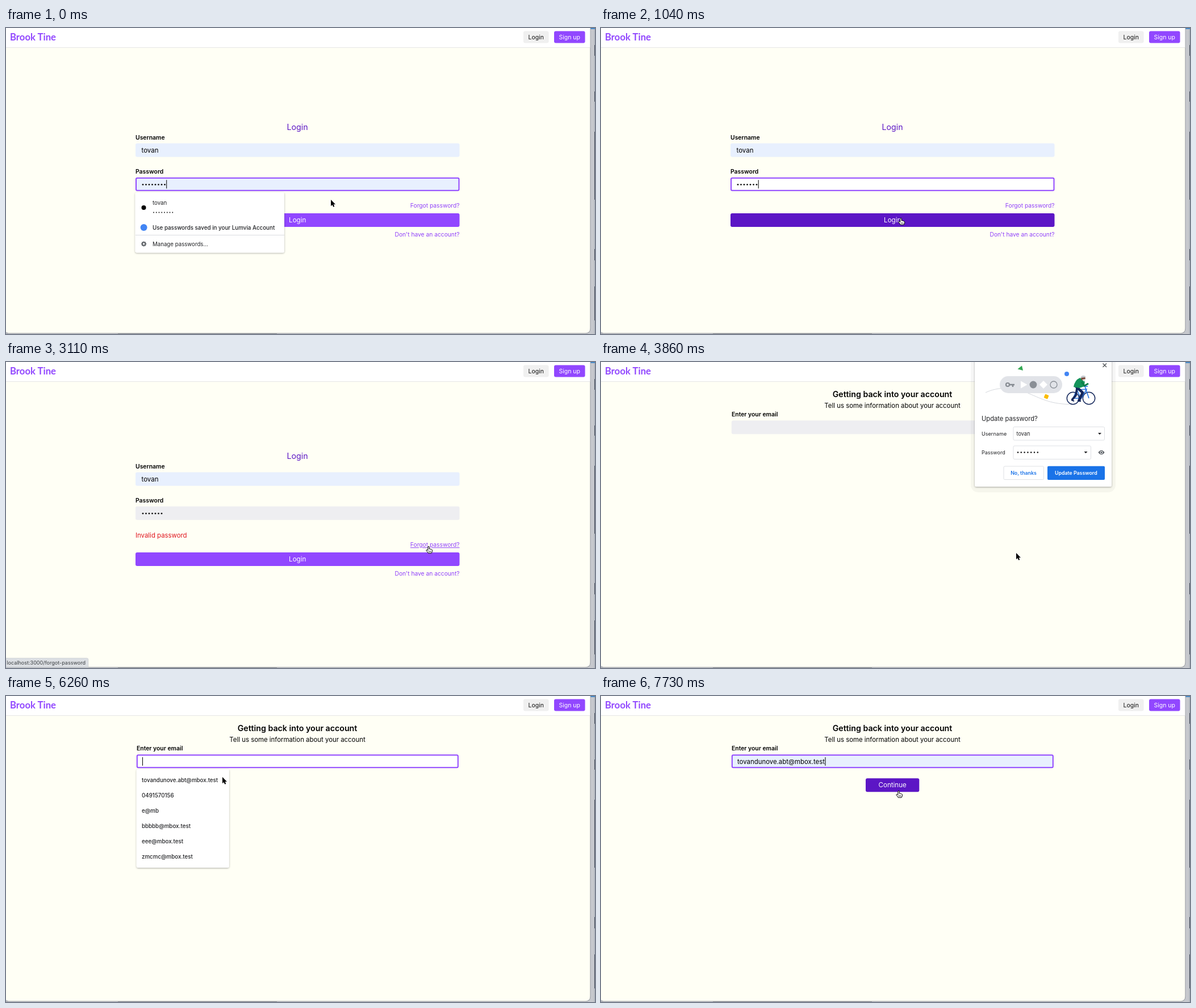
An HTML page for the animation above (8000 ms loop, 1037 px wide and 540 px high).

```html
<!DOCTYPE html>
<html lang="en">
<head>
<meta charset="utf-8">
<title>Login and password reset</title>
<style>
html, body { margin: 0; width: 100%; height: 100%; overflow: hidden; background: #fffff5; }
svg { display: block; width: 100vw; height: 100vh; }
text { font-family: Inter, Roboto, sans-serif; white-space: pre; }
</style>
</head>
<body>
<svg id="stage" viewBox="0 0 1037 540" preserveAspectRatio="none">
  <defs>
    <filter id="shadow" x="-10%" y="-10%" width="120%" height="125%">
      <feDropShadow dx="0" dy="1" stdDeviation="1.4" flood-color="#000" flood-opacity=".33"/>
    </filter>
  </defs>
  <g id="frame"></g>
  <g id="page"></g>
  <g id="pointer"></g>
</svg>
<script>
const LOOP = 8000, STEP = 148.7, LEAD = 14;
const PURPLE = '#9147ff', DEEP = '#5c16c5', LINK = '#8f3ffa', FILLED = '#e8f0fe', GREY = '#eeeef1', INK = '#202124';
const USER = 'tovan', EMAIL = 'tovandunove.abt@mbox.test';
const SUGGESTIONS = [EMAIL, '0491570156', 'e@mb', 'bbbbb@mbox.test', 'eee@mbox.test', 'zmcmc@mbox.test'];

// Pointer path: step, x, y of the hot spot
const PATH = [
  [0, 572, 303], [2, 571, 304], [4, 556, 313], [6, 528, 335], [12, 528, 335], [16, 684, 349],
  [19, 742, 328], [20, 744, 325], [24, 744, 325], [25, 737, 331], [26, 731, 337], [27, 733, 328],
  [28, 733, 328], [33, 752, 198], [34, 753, 196], [35, 753, 196], [39, 420, 121], [40, 385, 117],
  [41, 383, 121], [42, 381, 143], [43, 372, 146], [45, 368, 147], [48, 515, 163], [49, 524, 167]
];

const $ = id => document.getElementById(id);

const rect = (x, y, w, h, fill, r = 0, extra = '') =>
  `<rect x="${x}" y="${y}" width="${w}" height="${h}" rx="${r}" fill="${fill}" ${extra}/>`;
const path = (d, fill = 'none', stroke = 'none', width = 1, extra = '') =>
  `<path d="${d}" fill="${fill}" stroke="${stroke}" stroke-width="${width}" ${extra}/>`;
const circle = (x, y, r, fill, stroke = 'none', width = 1) =>
  `<circle cx="${x}" cy="${y}" r="${r}" fill="${fill}" stroke="${stroke}" stroke-width="${width}"/>`;
// y is the middle of the capitals
const text = (x, y, size, words, fill = '#000', weight = 400, anchor = 'start', extra = '') =>
  `<text x="${x}" y="${y + size * .36}" font-size="${size}" fill="${fill}" font-weight="${weight}" text-anchor="${anchor}" ${extra}>${words}</text>`;
const dots = (x, y, count, gap, r) =>
  Array.from({ length: count }, (_, i) => circle(x + i * gap, y, r, '#111')).join('');
const caret = (x, y) => rect(x, y - 7.5, 1, 15, '#000');
const field = (x, y, w, fill, focused) => focused
  ? rect(x + 1, y + 1, w - 2, 22, fill, 2, `stroke="${PURPLE}" stroke-width="2"`)
  : rect(x, y, w, 24, fill, 3);
const button = (x, y, w, label, fill) =>
  rect(x, y, w, 24, fill, 3) + text(x + w / 2, y + 12, 11.6, label, '#fff', 400, 'middle');
const card = (x, y, w, h) => rect(x, y, w, h, '#fff', 3, 'filter="url(#shadow)"');

function pointerAt(n) {
  const i = PATH.findIndex(key => key[0] > n);
  if (i < 0) return PATH[PATH.length - 1].slice(1);
  const [a, ax, ay] = PATH[i - 1], [b, bx, by] = PATH[i];
  const k = (n - a) / (b - a);
  return [ax + (bx - ax) * k, ay + (by - ay) * k];
}

const inside = ([x, y], left, top, w, h) => x >= left && x <= left + w && y >= top && y <= top + h;

function drawFrame() {
  const edge = [[30, 19], [112, 18], [183, 120], [390, 20], [456, 60]]
    .map(([y, h]) => rect(1036, y, 1, h, '#3c4453')).join('');
  return rect(0, 0, 1037, 540, '#c6c8cd') + rect(1029, 0, 8, 2, '#4a8ac6') + rect(1035.5, 2, 1.5, 538, '#aeb3bd') + edge +
    path('M0 538.6H1020Q1028.6 538.6 1028.6 530V0', 'none', '#9c9fa4', 1.4) +
    rect(197, 539, 280, 1, '#8c9095') +
    path('M0 0H1028.3V530Q1028.3 538.3 1020 538.3H4L0 536Z', '#fffff5') +
    rect(0, 0, 1028.3, 34, '#fff') + rect(0, 34, 1028.3, 1, '#e6e6e6') +
    text(7, 16, 16.7, 'Brook Tine', PURPLE, 700, 'start', 'style="font-family:Lato,sans-serif"') +
    rect(911, 5.5, 44.5, 21, '#f0f0f0', 3) + text(933.2, 16, 10.5, 'Login', '#111', 400, 'middle') +
    rect(965, 5.5, 54.5, 21, PURPLE, 3) + text(992.2, 16, 10.5, 'Sign up', '#fff', 400, 'middle');
}

function savedPasswords() {
  const teeth = Array.from({ length: 8 }, (_, i) =>
    rect(241.6, 376.4, 2, 2.6, '#5f6368', .4, `transform="rotate(${i * 45} 242.6 381)"`)).join('');
  return card(227.5, 290, 262.5, 106.5) +
    circle(242.5, 317, 4, '#000') +
    text(258, 308.5, 9.7, USER, INK) + dots(260, 325.5, 8, 4.75, .95) +
    circle(242.6, 352, 6, '#4285f4') +
    text(258, 352, 9.8, 'Use passwords saved in your Lumvia Account', INK, 500) +
    rect(228, 365, 262, 1, '#dadce0') +
    teeth + circle(242.6, 381, 2.6, 'none', '#5f6368', 1.7) +
    text(258, 381.3, 9.7, 'Manage passwords…', INK);
}

function loginPage(n, at) {
  const edited = n >= 2, focused = n < 8, failed = n >= 11;
  const up = failed ? -9 : 0, down = failed ? 9 : 0;
  const overButton = inside(at, 228, 327 + down, 570.5, 24);
  const overLink = n >= 18 && inside(at, 712, 314 + down, 87, 16);
  const count = edited ? 7 : 8;
  const fill = !edited ? FILLED : focused ? '#fff' : GREY;
  let out = text(513, 175 + up, 14.2, 'Login', DEEP, 400, 'middle') +
    text(228, 193 + up, 10.4, 'Username', '#000', 600) +
    field(228, 203.5 + up, 570.5, FILLED) + text(238.5, 215.7 + up, 11.5, USER) +
    text(228, 253 + up, 10.4, 'Password', '#000', 600) +
    field(228, 263.7 + up, 570.5, fill, focused) + dots(241, 276.3 + up, count, 5.5, 1.4) +
    (focused ? caret(238.2 + count * 5.5, 275.7) : '') +
    (failed ? text(228, 306, 11.4, 'Invalid password', '#e0161f') : '') +
    text(798.5, 313.5 + down, 10.25, 'Forgot password?', LINK, 400, 'end', overLink ? 'text-decoration="underline"' : '') +
    button(228, 327 + down, 570.5, 'Login', overButton ? DEEP : PURPLE) +
    text(798.5, 364.5 + down, 10.25, "Don't have an account?", LINK, 400, 'end');
  if (!edited) out += savedPasswords();
  return { out, hand: overButton || overLink };
}

function cyclist() {
  const blue = '#1f6fe0', navy = '#14275b';
  return circle(831, 64, 10.7, 'none', navy, 1.5) + circle(859, 64, 10.7, 'none', navy, 1.5) +
    path('M831 64L838 49L855 48L845 65L838 49M831 64H845M852 43L859 64M850 43H857', 'none', blue, 1.5) +
    path('M836 43L848 54L841 69', 'none', navy, 4.6, 'stroke-linejoin="round"') +
    path('M838 46L836 59L829 67', 'none', navy, 3.6, 'stroke-linejoin="round"') +
    path('M839 69H845M828 67L833 69', 'none', navy, 2) +
    path('M832 44Q834 32 843 28L852 32L851 43L842 46Z', '#14935a') +
    path('M846 35L851 42L858 38', 'none', '#0d7d4b', 3, 'stroke-linejoin="round"') +
    circle(849, 29, 3.8, '#7a4b3c') + path('M844 28Q846 22 853 25L853 27Z', '#c5cad0') +
    path('M847 31L853 30L851 35Z', '#e9e9e9');
}

function updatePopup(overNo) {
  const box = (x, y, w, h, fill = '#fff') => rect(x, y, w, h, fill, 2, 'stroke="#dfe1e5" stroke-width="1"');
  const drop = (x, y) => path(`M${x - 3} ${y - 1.5}H${x + 3}L${x} ${y + 1.8}Z`, INK);
  return rect(651, -12, 255, 242, '#000', 13, 'opacity=".035"') + card(658, -8, 241, 228) +
    path('M883.5 2.5L890 9M890 2.5L883.5 9', 'none', '#4d5156', 1.3) +
    path('M677 54C698 44 724 43 752 55S792 74 830 75', 'none', '#d5d8dd', 1) +
    rect(702, 25, 110, 30, '#e1e3e8', 15) +
    circle(716, 40, 3, 'none', '#858a91', 2.2) + path('M719 40H728M725 40V44', 'none', '#858a91', 2.4) +
    path('M739 33.5L750.5 40L739 46.5Z', '#fff') + circle(761, 40, 6.4, '#8a8f96') +
    path('M779 33L786 40L779 47L772 40Z', '#fff') + circle(797, 40, 6, 'none', '#8a8f96', 1.3) +
    path('M733.5 12.5L741 6.5L743 15Z', '#34a853') + circle(820, 21, 4, '#4285f4') +
    rect(780.6, 57.5, 7, 7, '#fbbc04', 1, 'transform="rotate(22 784 61)"') + cyclist() +
    text(670, 100, 11.2, 'Update password?', INK) +
    text(670, 126.5, 9.1, 'Username', INK) + box(726, 114.5, 160.5, 23.5) + text(731.5, 126.5, 9.2, USER, INK) + drop(878, 126.5) +
    text(670, 159.5, 9, 'Password', INK) + box(726, 148, 136.5, 23.5) + dots(734, 159.5, 7, 5.8, 1.25) + drop(853.5, 159.5) +
    path('M875.5 159.5Q881 151.8 886.5 159.5Q881 167.2 875.5 159.5Z', '#50555b') + circle(881, 159.5, 2.6, '#fff') + circle(881, 159.5, 1.6, '#50555b') +
    box(709, 184, 70.5, 23.5, overNo ? '#e9f1fe' : '#fff') + text(744, 195.8, 8.8, 'No, thanks', '#1a73e8', 600, 'middle') +
    rect(786, 183.7, 101, 24.3, '#1a73e8', 2) + text(836.3, 195.8, 8.8, 'Update Password', '#fff', 600, 'middle');
}

function resetPage(n, at) {
  const focused = n >= 40, listed = n >= 41 && n < 45, chosen = n >= 45;
  const preview = n === 43 || n === 44;
  const overContinue = chosen && inside(at, 466, 145, 94, 24);
  let out = text(513, 57, 14.2, 'Getting back into your account', '#000', 600, 'middle') +
    text(513, 76.5, 11.4, 'Tell us some information about your account', '#000', 400, 'middle') +
    text(230, 92.7, 10.4, 'Enter your email', '#000', 600) +
    field(229.8, 103.3, 567, !focused ? GREY : chosen || preview ? FILLED : '#fff', focused);
  if (chosen || preview) out += text(240, 115.5, 11.4, EMAIL, '#000', 400, 'start', 'id="email"');
  if (focused && (n < 49 || n >= 52)) out += `<g id="caret">${caret(240, 115.5)}</g>`;
  if (chosen) out += button(466, 145.3, 94.3, 'Continue', overContinue ? DEEP : PURPLE);
  if (listed) {
    out += card(229.8, 129, 163, 174) + (preview ? rect(230, 134.5, 162.8, 27, '#e8e8e9') : '') +
      SUGGESTIONS.map((s, i) => text(239, 148.2 + i * 27.1, 9.75, s, INK, 500)).join('');
  }
  if (n < 35) out += updatePopup(inside(at, 709, 184, 70, 23));
  return { out, hand: overContinue || n < 25 };
}

const statusBar = () =>
  path('M0 522.5H142Q145 522.5 145 525.5V538.5H0Z', '#dcdfe3', '#cacdd1', .6) +
  text(1.3, 531, 9.05, 'localhost:3000/forgot-password', '#3c4043');

function drawPointer([x, y], hand) {
  const shape = hand
    ? path('M-1.2 1.2Q0-.7 1.1 1V5L2.2 4.7Q3.3 4.7 3.3 5.5Q5 5 5.2 6.2Q6.6 6 6.6 7.6Q6.7 10 5 12.2H-.8Q-1.8 10-4 7.8Q-4.2 6-2.4 6.5L-1.2 7.6Z', '#fff', '#000', 1, 'stroke-linejoin="round"') +
      path('M.5 8.2V10.6M2.3 8.2V10.6M4 8.2V10.6', 'none', '#000', .7)
    : path('M0 0V11.2L2.5 9L4.2 12.8L6.3 11.9L4.6 8.2H8Z', '#000', '#fff', 1, 'paint-order="stroke"');
  return `<g transform="translate(${x} ${y})">${shape}</g>`;
}

function render(n) {
  const at = pointerAt(n);
  const { out, hand } = n < 23 ? loginPage(n, at) : resetPage(n, at);
  $('page').innerHTML = out + (n >= 20 && n < 25 ? statusBar() : '');
  $('pointer').innerHTML = drawPointer(at, hand);
  const email = $('email'), mark = $('caret');
  if (email && mark) mark.setAttribute('transform', `translate(${email.getComputedTextLength() + .5} 0)`);
}

$('frame').innerHTML = drawFrame();
const start = performance.now();
let shown = -1;
function tick() {
  const n = Math.floor(((performance.now() - start) % LOOP + LEAD) / STEP);
  if (n !== shown) render(shown = n);
  requestAnimationFrame(tick);
}
tick();
</script>
</body>
</html>
```
